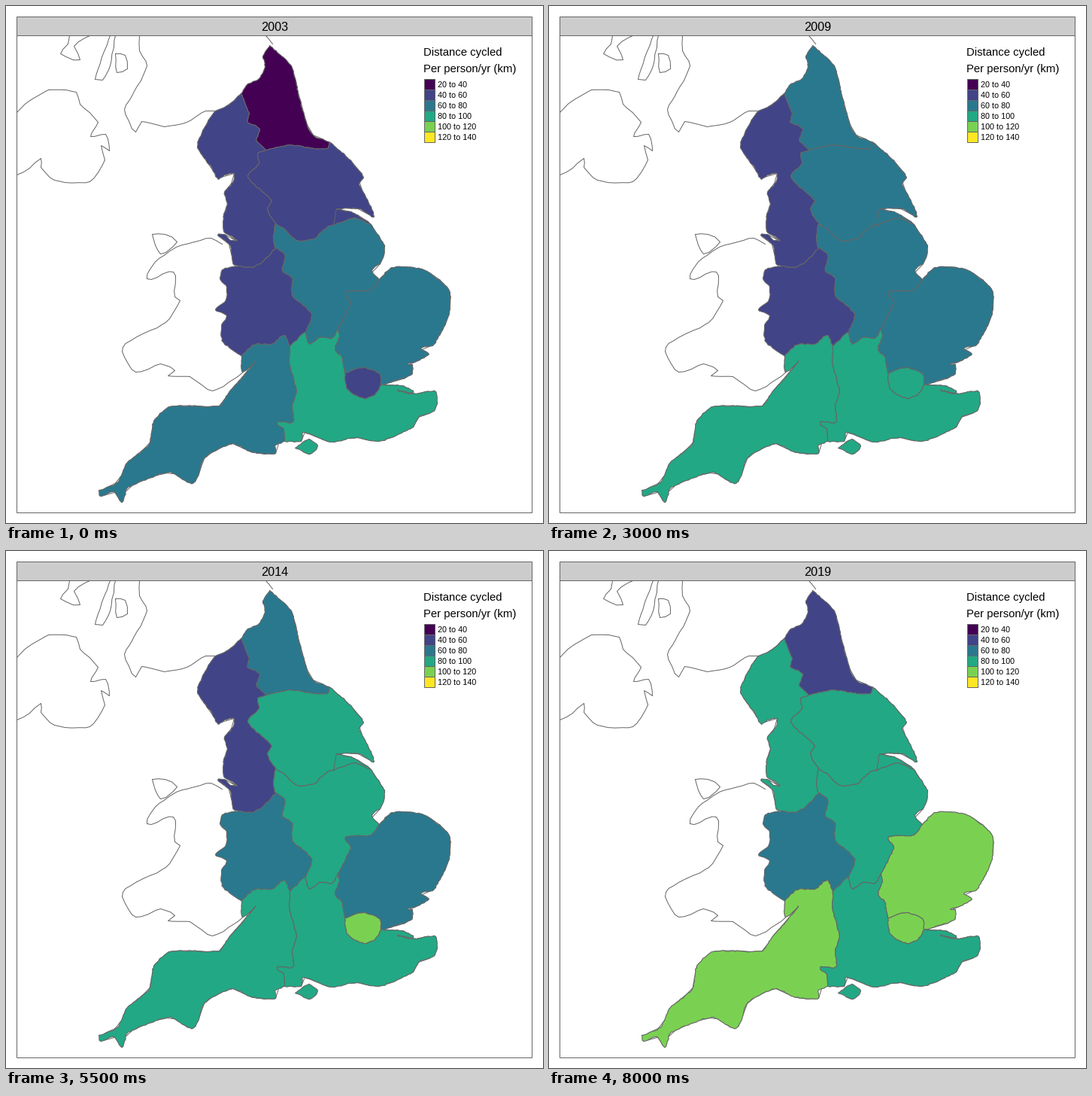
Recreate the animation shown at these times as a matplotlib script. Size 714 px wide and 687 px high, loop 8.5 s.

```python
import numpy as np
import matplotlib.pyplot as plt
from matplotlib.animation import FuncAnimation
from matplotlib.patches import Polygon, Rectangle

W, H, DPI = 714, 687, 100
PX = 72 / DPI
GREY = "#666666"
PALETTE = plt.get_cmap("viridis")(np.linspace(0, 1, 6))
FIRST_YEAR, LAST_YEAR = 2003, 2019

rng = np.random.default_rng(4)
plt.rcParams["font.family"] = "Liberation Sans"


def trace(*xy, step=3, amp=0.7):
    """Curve through a few key points, with seeded roughness in between."""
    p = np.array(xy, float).reshape(-1, 2)
    ends = np.vstack([p[:1], p, p[-1:]])
    heading = ends[2:] - ends[:-2]
    heading /= np.linalg.norm(heading, axis=1, keepdims=True) + 1e-9
    out = [p[:1]]
    for a, b, u, v in zip(p, p[1:], heading, heading[1:]):
        size = np.linalg.norm(b - a)
        n = max(1, round(size / step))
        t = np.arange(1, n + 1)[:, None] / n
        ease = t * t * (3 - 2 * t)
        bend = 0.6 * size * t * (1 - t) * ((1 - t) * u - t * v)
        noise = rng.uniform(-amp, amp, (n, 2)) * (t < 1)
        out.append(a + (b - a) * ease + bend + noise)
    return np.concatenate(out)


# Borders, each stored once and shared by the regions on both sides.
ARCS = {
    "ne_top": trace(350, 52, 341, 66, 344, 80, 336, 96, 320, 104, 312, 116),
    "ne_coast": trace(350, 52, 379, 79, 388, 115, 399, 155, 409, 172, 429, 180),
    "ne_yh": trace(429, 180, 428, 188, 408, 189, 376, 184, 345, 191),
    "ne_nw": trace(312, 116, 323, 143, 320, 153, 337, 163, 332, 177, 345, 191),
    "nw_yh": trace(345, 191, 334, 195, 336, 209, 321, 225, 334, 241, 353, 258,
                   347, 269, 358, 289),
    "nw_em": trace(358, 289, 355, 306, 358, 321),
    "nw_wm": trace(309, 345, 326, 347, 340, 340, 358, 321),
    "nw_coast": trace(312, 116, 297, 130, 276, 141, 264, 160, 254, 186, 274, 216,
                      282, 230, 290, 224, 303, 222, 301, 234, 290, 247, 294, 262,
                      289, 277, 289, 299, 307, 311, 298, 311, 290, 303, 281, 304,
                      297, 317, 302, 343, 309, 345),
    "yh_coast": trace(429, 180, 450, 197, 475, 227, 469, 236, 489, 279, 470, 269,
                      439, 269),
    "yh_south": trace(439, 269, 463, 275, 485, 290),
    "yh_em": trace(358, 289, 370, 296, 386, 311, 409, 309, 426, 294, 448, 286,
                   464, 281, 485, 290),
    "em_coast": trace(485, 290, 503, 320, 498, 340, 486, 351, 496, 363),
    "em_ee": trace(496, 363, 485, 377, 451, 380, 458, 394, 441, 428),
    "em_se": trace(397, 433, 403, 449, 416, 440, 433, 441, 441, 428),
    "wm_em": trace(358, 321, 370, 330, 367, 352, 380, 361, 380, 384, 406, 409, 397, 433),
    "wm_west": trace(309, 345, 287, 350, 284, 362, 293, 373, 291, 392, 278, 403,
                     293, 411, 286, 424, 288, 446, 313, 465),
    "wm_sw": trace(313, 465, 328, 450, 355, 448, 369, 437, 377, 452),
    "wm_se": trace(377, 452, 388, 441, 397, 433),
    "ee_coast": trace(496, 363, 513, 347, 555, 350, 588, 376, 589, 408, 568, 450,
                      551, 455, 562, 462, 547, 471, 533, 476, 540, 476, 538, 490,
                      498, 503),
    "ee_se": trace(441, 428, 443, 437, 437, 456, 446, 466, 450, 487),
    "lon_n": trace(450, 487, 475, 480, 497, 489, 498, 503),
    "lon_s": trace(450, 487, 453, 508, 475, 521, 490, 516, 498, 503),
    "se_coast": trace(498, 503, 525, 504, 541, 513, 520, 510, 545, 515, 571, 512,
                      570, 536, 548, 546, 541, 559, 496, 578, 465, 573, 431, 579,
                      395, 566, 392, 578, 370, 578),
    "sw_se": trace(377, 452, 377, 478, 386, 512, 380, 530, 381, 552, 360, 553,
                   369, 562, 370, 578),
    "sw_north": trace(313, 465, 314, 486, 331, 472, 292, 518, 284, 531, 217, 532,
                      196, 551, 190, 582, 161, 606, 147, 633, 123, 643),
    "sw_south": trace(123, 643, 125, 651, 143, 645, 154, 659, 161, 640, 217, 619,
                      248, 634, 264, 599, 301, 581, 325, 592, 358, 594, 357, 584,
                      370, 578),
}
WIGHT = trace(384, 587, 402, 575, 414, 584, 404, 595, 384, 587)

# Ring of borders (a minus walks backwards) and the palette step from each year on.
REGIONS = {
    "ne": ("ne_coast ne_yh -ne_nw -ne_top",
           {2003: 0, 2008: 1, 2009: 2, 2010: 1, 2014: 2, 2017: 3, 2018: 2, 2019: 1}),
    "nw": ("ne_nw nw_yh nw_em -nw_wm -nw_coast",
           {2003: 1, 2012: 2, 2014: 1, 2015: 2, 2018: 3}),
    "yh": ("yh_coast yh_south -yh_em -nw_yh -ne_yh",
           {2003: 1, 2009: 2, 2013: 3}),
    "em": ("yh_em em_coast em_ee -em_se -wm_em -nw_em",
           {2003: 2, 2004: 1, 2006: 2, 2010: 3, 2012: 2, 2013: 3}),
    "wm": ("nw_wm wm_em -wm_se -wm_sw -wm_west",
           {2003: 1, 2004: 0, 2008: 1, 2012: 2, 2015: 1, 2019: 2}),
    "ee": ("em_ee ee_se lon_n -ee_coast",
           {2003: 2, 2007: 3, 2008: 2, 2012: 3, 2014: 2, 2015: 3, 2016: 2, 2017: 3,
            2018: 2, 2019: 4}),
    "sw": ("wm_sw sw_se -sw_south -sw_north",
           {2003: 2, 2007: 3, 2010: 4, 2012: 5, 2013: 4, 2014: 3, 2015: 4}),
    "se": ("em_se ee_se lon_s se_coast -sw_se wm_se",
           {2003: 3, 2004: 2, 2007: 3, 2015: 4, 2016: 3, 2017: 4, 2019: 3}),
    "lon": ("lon_n -lon_s",
            {2003: 1, 2004: 2, 2005: 3, 2014: 4, 2017: 3, 2018: 4}),
}

# Coarser coastline of the surrounding land.
ABROAD = [
    (14, 141, 30, 126, 56, 111, 93, 114, 98, 130, 122, 154, 112, 173, 132, 170,
     137, 192, 126, 185, 131, 204, 111, 233, 64, 231, 46, 214, 46, 202, 31, 215, 14, 224),
    (84, 39, 82, 50, 72, 63, 98, 71, 90, 53, 111, 39),
    (138, 39, 118, 97, 128, 98, 138, 79, 145, 39),
    (145, 63, 158, 65, 161, 83, 147, 88, 145, 63),
    (177, 39, 177, 59, 187, 79, 167, 119, 157, 137, 172, 167, 180, 153, 210, 160,
     240, 154, 265, 139, 290, 139),
    (345, 39, 354, 50),
    (287, 316, 272, 308, 234, 317, 203, 335, 187, 362, 222, 353, 224, 386, 231, 391,
     212, 420, 155, 453, 172, 486, 205, 475, 224, 484, 215, 491, 244, 492, 274, 511,
     309, 491, 331, 472),
    (194, 303, 211, 303, 227, 313, 205, 329, 194, 303),
]


def ring(spec):
    return np.concatenate([ARCS[n[1:]][::-1] if n[0] == "-" else ARCS[n]
                           for n in spec.split()])


def level(steps, year):
    return steps[max(y for y in steps if y <= year)]


fig = plt.figure(figsize=(W / DPI, H / DPI), dpi=DPI, facecolor="white")
ax = fig.add_axes([0, 0, 1, 1])
ax.set(xlim=(-0.5, W - 0.5), ylim=(H - 0.5, -0.5))
ax.axis("off")


def box(x, y, w, h, fill):
    ax.add_patch(Rectangle((x, y), w, h, fc=fill, ec=GREY, lw=PX, snap=False, zorder=5))


def label(x, y, text, size):
    return ax.text(x, y, text, size=size * PX, va="baseline", ha="left", zorder=6)


def line(xy, z=1):
    ax.plot(*xy.T, color=GREY, lw=PX, zorder=z)


def shape(xy):
    patch = Polygon(xy, closed=True, ec=GREY, lw=1.1 * PX, joinstyle="round", zorder=2)
    return ax.add_patch(patch)


for keys in ABROAD:
    line(trace(*keys, step=8))

# The coarse coast also shows as slivers along the detailed one.
for name, arc in ARCS.items():
    if name.endswith(("coast", "north", "south")):
        line(arc[::5])

areas = [([shape(ring(spec))], steps) for spec, steps in REGIONS.values()]
areas[list(REGIONS).index("se")][0].append(shape(WIGHT))
line(trace(439, 269, 435, 292), z=3)

box(14, 39, 685, 634, "none")
box(14, 14, 685, 25, "#CCCCCC")
title = label(338.5, 32.5, "", 16.3)

label(554.5, 65.5, "Distance cycled", 14.9)
label(554.5, 87.5, "Per person/yr (km)", 14.9)
for i, color in enumerate(PALETTE):
    low = 20 + 20 * i
    box(556, 97 + 14 * i, 14, 14, color)
    label(573.5, 107.5 + 14 * i, f"{low} to {low + 20}", 10.8)


def update(i):
    year = FIRST_YEAR + i
    title.set_text(str(year))
    for patches, steps in areas:
        for patch in patches:
            patch.set_facecolor(PALETTE[level(steps, year)])
    return [title]


anim = FuncAnimation(fig, update, frames=LAST_YEAR - FIRST_YEAR + 1, interval=500,
                     repeat=True, repeat_delay=0)
plt.show()
```
